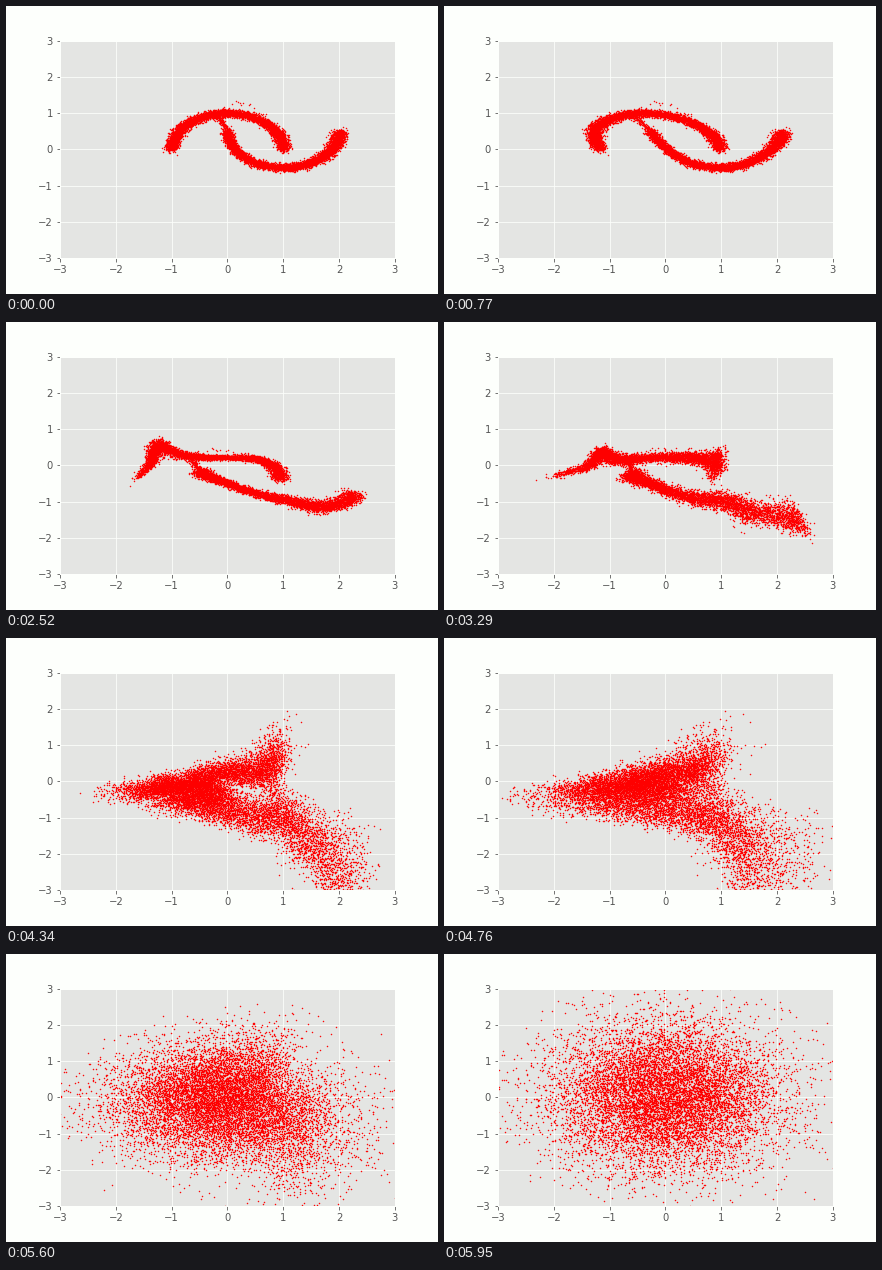
These frames come from a looping animation (432 by 288 pixels, 8950 ms). A matplotlib script:

```python
import numpy as np
import matplotlib.pyplot as plt
from matplotlib.animation import FuncAnimation

LOOP_MS, TICK_MS, STEP_MS = 8950, 25, 70
LAST_STEP = 85
COUNT = 10000
PAPER, PANEL, INK = "#FDFFFC", "#E4E5E3", "#555555"
rng = np.random.default_rng(7)


def ramp(v, center, rate):
    """Smooth step from 0 to 1."""
    return (1 + np.tanh(rate * (v - center))) / 2


def bump(v, center, width):
    return np.exp(-((v - center) / width) ** 2)


def moons(bridge=160, stray=10):
    """Two interleaved half circles, a thin bridge between them and some strays."""
    a = rng.uniform(0, np.pi, COUNT // 2)
    b = rng.uniform(0, np.pi, COUNT - a.size - bridge - stray)
    u = rng.uniform(0, 1, bridge)
    x = np.concatenate([-np.cos(a), 1 - np.cos(b), -0.2 * u, np.full(stray, 0.28)])
    y = np.concatenate([np.sin(a), 0.5 - np.sin(b), 0.5 + 0.5 * u, np.full(stray, 1.24)])
    noise = np.full(COUNT, 0.051)
    noise[-bridge - stray:] = 0.035
    noise[-stray:] = 0.1
    return (x + rng.normal(size=COUNT) * noise * (0.9 + 0.25 * np.abs(x)),
            y + rng.normal(size=COUNT) * noise)


def gaussianize(moved, given, chunk):
    """Rank-map one axis to a normal law within slices of the other."""
    out = np.empty(COUNT)
    for block in np.array_split(np.argsort(given), COUNT // chunk):
        ranked = block[np.argsort(moved[block])]
        out[ranked] = np.sort(rng.normal(size=block.size))
    return out


def bend_x(x, y):
    stretch = 1 + 0.26 * ramp(y, 0.15, 2.2)
    return x * stretch - 0.03 - 0.48 * ramp(y, 0.35, 1.8)


def drop_y(x, y):
    squash = 1 - 0.37 * bump(x, 0.05, 0.7)
    shift = 0.33 * ramp(x, -0.3, 3) - 0.65 * ramp(x, -1.15, 4) - 1.1 * ramp(x, 1.65, 2)
    return y * squash + shift


def shear_x(x, y):
    stretch = 1.66 - 0.86 * ramp(y, -0.15, 2)
    return x * stretch + 0.6 * (y - np.hypot(y, 0.1))


def fan_y(x, y):
    stretch = 0.6 + 0.6 * ramp(x, -0.6, 3) + 2.2 * ramp(x, 1, 4)
    shift = 2.6 * ramp(x, 0.97, 4) - 6 * ramp(x, 2.45, 1.6) - 0.45 * bump(x, -1.1, 0.55)
    jitter = rng.normal(size=COUNT) * (0.13 + 0.15 * ramp(x, 0.3, 2))
    return y * stretch + shift + jitter


def spread_x(x, y):
    d = y + 0.35
    center = (1.9 - 0.45 * np.tanh(2 * d)) * np.tanh(d * d)
    width = 0.45 + 0.55 * bump(y, -0.7, 0.7)
    return gaussianize(center + width * gaussianize(x, y, 80), y, COUNT)


def spread_y(x, y):
    return gaussianize(y, x, 80)


def flow():
    """Each layer moves one axis by a rule that depends on the other."""
    x, y = moons()
    states = [(x, y)]
    for move_x, move_y in ((bend_x, drop_y), (shear_x, fan_y), (spread_x, spread_y)):
        x = move_x(x, y)
        states.append((x, y))
        y = move_y(x, y)
        states.append((x, y))
    return [np.column_stack(state) for state in states]


STATES = flow()
LAYERS = len(STATES) - 1

plt.rcParams.update({"font.family": "DejaVu Sans", "font.size": 10})
fig = plt.figure(figsize=(6, 4), dpi=72, facecolor=PAPER)
ax = fig.add_axes([0.125, 0.125, 0.775, 0.755], facecolor=PANEL)
ax.set(xlim=(-3, 3), ylim=(-3, 3), xticks=range(-3, 4), yticks=range(-3, 4))
ax.set_axisbelow(True)
ax.grid(color=PAPER, linewidth=0.8)
ax.tick_params(colors=INK, labelsize=10, length=3.5, width=0.8)
for spine in ax.spines.values():
    spine.set(color=PAPER, linewidth=1)
dots = ax.scatter(*STATES[0].T, s=1, color="red", linewidths=0.5)


def draw(frame):
    step = min((frame * TICK_MS + TICK_MS - 1) // STEP_MS, LAST_STEP)
    progress = step / LAST_STEP * LAYERS
    layer = min(int(progress), LAYERS - 1)
    mix = progress - layer
    dots.set_offsets((1 - mix) * STATES[layer] + mix * STATES[layer + 1])
    return (dots,)


anim = FuncAnimation(fig, draw, frames=LOOP_MS // TICK_MS, interval=TICK_MS,
                     repeat=True, repeat_delay=0)
plt.show()
```
